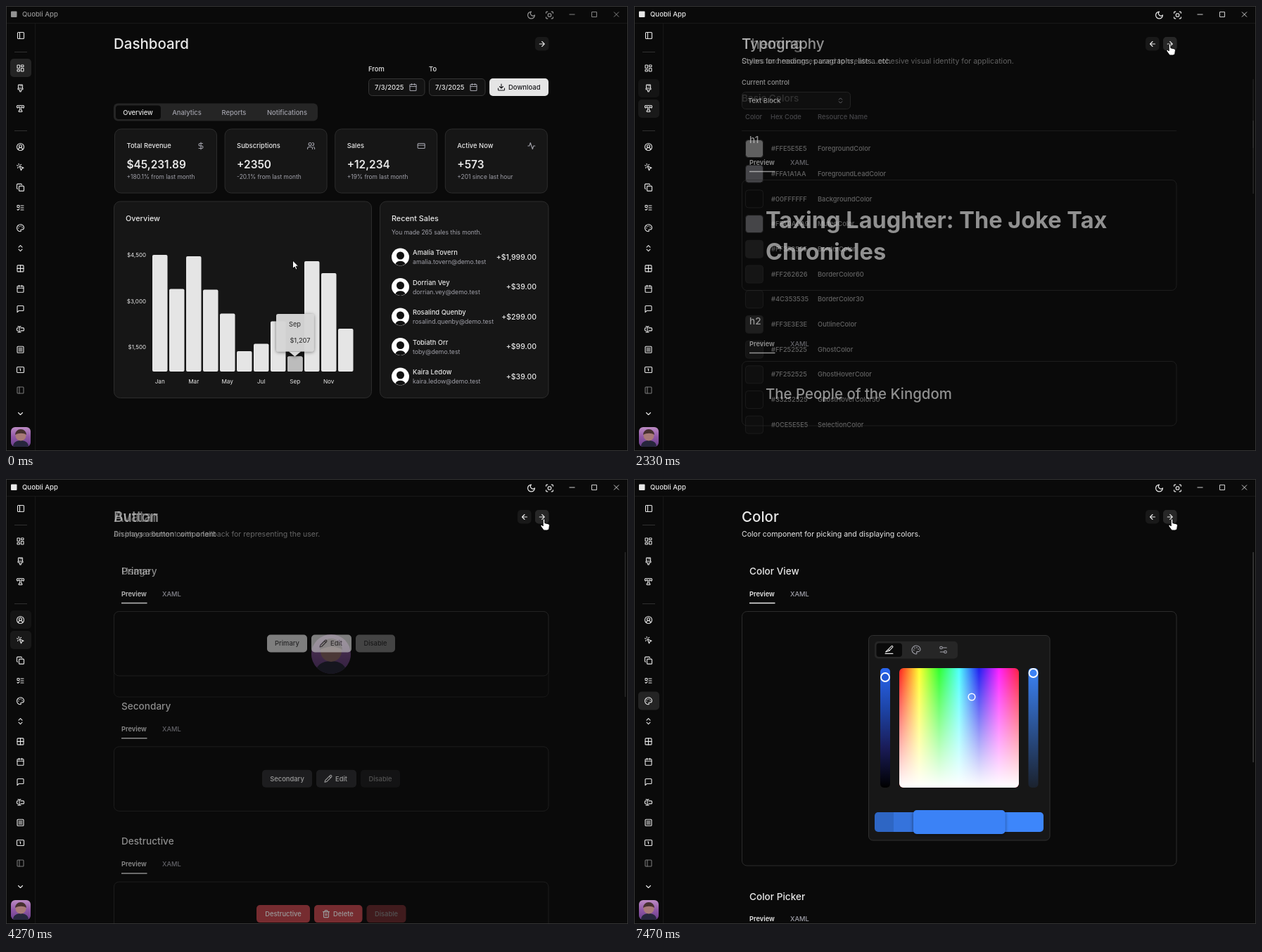
An HTML page that plays this animation: 884 by 633 pixels, repeating every 8 s.

```html
<!DOCTYPE html>
<html lang="en">
<head>
<meta charset="utf-8">
<title>Component gallery</title>
<style>
html, body { margin: 0; width: 100%; height: 100%; overflow: hidden; background: #0a0a0a; }
svg { display: block; width: 884px; height: 633px; }
text { font-family: Inter, sans-serif; white-space: pre; }
.icon { fill: none; stroke-linecap: round; stroke-linejoin: round; }
</style>
</head>
<body>
<svg id="stage" viewBox="0 0 884 633"></svg>
<script>
const FG = '#e8e8e8', MUTED = '#a1a1aa', DARK = '#18181b', LINE = '#2c2c2c', CARD = '#161616';

// Drawing helpers
const text = (x, y, s, size = 9.4, fill = FG, anchor = 'start', weight = 500) =>
  `<text x="${x}" y="${y}" font-size="${size}" font-weight="${weight}" fill="${fill}" text-anchor="${anchor}">${s}</text>`;
const mid = (x, y, s, fill = FG, size = 9.4) => text(x, y, s, size, fill, 'middle');
const rect = (x, y, w, h, r = 0, fill = 'none', stroke = 'none', more = '') =>
  `<rect x="${x}" y="${y}" width="${w}" height="${h}" rx="${r}" fill="${fill}" stroke="${stroke}" ${more}/>`;
const circle = (x, y, r, fill = 'none', stroke = 'none', width = 1) =>
  `<circle cx="${x}" cy="${y}" r="${r}" fill="${fill}" stroke="${stroke}" stroke-width="${width}"/>`;
const path = (d, stroke = LINE, fill = 'none', width = 1) =>
  `<path d="${d}" stroke="${stroke}" fill="${fill}" stroke-width="${width}"/>`;
const group = (s, opacity = 1, id = '') => `<g id="${id}" opacity="${opacity}">${s}</g>`;
const each = (list, f) => list.map(f).join('');

// Icons on a 24-unit grid
const p = d => `<path d="${d}"/>`;
const box = (x, y, w, h, r = 2) => `<rect x="${x}" y="${y}" width="${w}" height="${h}" rx="${r}"/>`;
const dot = (x, y, r) => `<circle cx="${x}" cy="${y}" r="${r}"/>`;
const ICONS = {
  panel: box(3, 3, 18, 18) + p('M9 3v18'),
  dash: box(3, 3, 7, 9, 1) + box(14, 3, 7, 5, 1) + box(14, 12, 7, 9, 1) + box(3, 16, 7, 5, 1),
  brush: p('M10 2v2M14 2v4M6 12V3a1 1 0 0 1 1-1h10a1 1 0 0 1 1 1v9zM6 12a1 1 0 0 0-1 1v1a2 2 0 0 0 2 2h2a1 1 0 0 1 1 1v3a2 2 0 1 0 4 0v-3a1 1 0 0 1 1-1h2a2 2 0 0 0 2-2v-1a1 1 0 0 0-1-1'),
  type: p('M14 17h1a2 2 0 0 1 0 4H9a2 2 0 0 1 0-4h1V7H6v1a2 2 0 0 1-4 0V5a2 2 0 0 1 2-2h16a2 2 0 0 1 2 2v3a2 2 0 0 1-4 0V7h-4z'),
  user: p('M18 20a6 6 0 0 0-12 0') + dot(12, 10, 4) + dot(12, 12, 10),
  click: p('M14 4l-2 2M5 8l-3-1M6 12l-2 2M7 2l1 3M9 9l12 5-5 2-2 5z'),
  copy: box(8, 8, 14, 14) + p('M4 16a2 2 0 0 1-2-2V4a2 2 0 0 1 2-2h10a2 2 0 0 1 2 2'),
  todo: box(3, 5, 6, 6, 1) + p('M3 17l2 2 4-4M13 6h8M13 12h8M13 18h8'),
  palette: dot(13.5, 6.5, .5) + dot(17.5, 10.5, .5) + dot(8.5, 7.5, .5) + dot(6.5, 12.5, .5) +
    p('M12 2a10 10 0 0 0 0 20c1.6 0 2.1-1.6 1.2-2.8-1-1.4 0-2.8 1.2-2.8h2c3 0 5.6-2.5 5.6-5.6C22 6 17.5 2 12 2z'),
  updown: p('M7 15l5 5 5-5M7 9l5-5 5 5'),
  grid: box(3, 3, 18, 18) + p('M12 3v18M3 12h18'),
  calendar: box(3, 4, 18, 18) + p('M8 2v4M16 2v4M3 10h18'),
  chat: p('M21 15a2 2 0 0 1-2 2H7l-4 4V5a2 2 0 0 1 2-2h14a2 2 0 0 1 2 2z'),
  input: p('M5 4h1a3 3 0 0 1 3 3 3 3 0 0 1 3-3h1M13 20h-1a3 3 0 0 1-3-3 3 3 0 0 1-3 3H5M5 16H4a2 2 0 0 1-2-2v-4a2 2 0 0 1 2-2h1M13 8h7a2 2 0 0 1 2 2v4a2 2 0 0 1-2 2h-7M9 7v10'),
  list: box(3, 3, 18, 18) + p('M7 8h10M7 12h10M7 16h10'),
  number: box(2, 4, 20, 16) + p('M10 9h2v6'),
  down: p('M6 9l6 6 6-6'),
  moon: p('M12 3a6 6 0 0 0 9 9 9 9 0 1 1-9-9z'),
  full: p('M3 7V5a2 2 0 0 1 2-2h2M17 3h2a2 2 0 0 1 2 2v2M21 17v2a2 2 0 0 1-2 2h-2M7 21H5a2 2 0 0 1-2-2v-2') + box(8, 8, 8, 8),
  right: p('M5 12h14M12 5l7 7-7 7'),
  left: p('M19 12H5M12 5l-7 7 7 7'),
  save: p('M21 15v4a2 2 0 0 1-2 2H5a2 2 0 0 1-2-2v-4M7 10l5 5 5-5M12 15V3'),
  dollar: p('M12 2v20M17 5H9.5a3.5 3.5 0 0 0 0 7h5a3.5 3.5 0 0 1 0 7H6'),
  users: dot(9, 7, 4) + p('M16 21v-2a4 4 0 0 0-4-4H6a4 4 0 0 0-4 4v2M22 21v-2a4 4 0 0 0-3-4M16 3a4 4 0 0 1 0 8'),
  credit: box(2, 5, 20, 14) + p('M2 10h20'),
  pulse: p('M22 12h-4l-3 9L9 3l-3 9H2'),
  pencil: p('M17 3a2.8 2.8 0 0 1 4 4L7.5 20.5 2 22l1.5-5.5zM15 5l4 4'),
  trash: p('M3 6h18M19 6v14a2 2 0 0 1-2 2H7a2 2 0 0 1-2-2V6M8 6V4a2 2 0 0 1 2-2h4a2 2 0 0 1 2 2v2M10 11v6M14 11v6'),
  paint: p('M3 21h18M4 17l9-3 8-9a2 2 0 0 0-3-2l-8 8zM10 11l3 3'),
  sliders: p('M20 7h-9M14 17H5') + dot(17, 17, 3) + dot(7, 7, 3)
};
const icon = (name, x, y, color = FG, k = .5) =>
  `<g class="icon" stroke="${color}" stroke-width="${k > .55 ? 1.8 : 2.2}" transform="translate(${x} ${y}) scale(${k}) translate(-12 -12)">${ICONS[name]}</g>`;

const person = (x, y, k) => `<g transform="translate(${x} ${y}) scale(${k})">
  <path d="M-11 14C-11 7-5 5 0 5S11 7 11 14z" fill="#26263c"/><circle cy="-2" r="7.5" fill="#a87a78"/>
  <path d="M-8 -3a8 8 0 0 1 16 0c-4-3-11-3-16 0z" fill="#46302f"/></g>`;

// Shared page parts
const header = (title, sub) => text(153, 61.3, title, 20.5) + text(153, 82.3, sub, 10.55, FG, 'start', 400);
const scrollbar = (y, end) => rect(879.5, y, 1.2, end - y, .5, '#484848');
const section = (title, y, h) => text(164, y + 4.8, title, 13.6) +
  text(164, y + 35.7, 'Preview', 9.3, FG, 'start', 600) + text(222, y + 35.7, 'XAML', 9.3, MUTED) +
  path(`M164 ${y + 45.5}h36.5`, FG, 'none', 1.5) + rect(153.5, y + 57.5, 617.5, h, 7, 'none', LINE);
const field = (x, y, w, s, color = FG) => rect(x, y, w, 24, 5, '#141414', '#333') + text(x + 8.5, y + 15.7, s, 9.4, color);
const select = (x, y, w, s) => field(x, y, w, s) + icon('updown', x + w - 14, y + 12, MUTED, .45);
const button = (x, y, w, s, fill, color, glyph) => rect(x, y, w, 25, 5, fill) +
  (glyph ? icon(glyph, x + 17, y + 12.5, color) + text(x + 27, y + 15.8, s, 9.4, color) : mid(x + w / 2, y + 15.8, s, color));

function dashboard() {
  const stats = [
    ['Total Revenue', '$45,231.89', '+180.1% from last month', 'dollar'],
    ['Subscriptions', '+2350', '-20.1% from last month', 'users'],
    ['Sales', '+12,234', '+19% from last month', 'credit'],
    ['Active Now', '+573', '+201 since last hour', 'pulse']
  ];
  const sales = [
    ['Amalia Tovern', 'amalia.tovern', '1,999'],
    ['Dorrian Vey', 'dorrian.vey', '39'],
    ['Rosalind Quenby', 'rosalind.quenby', '299'],
    ['Tobiath Orr', 'toby', '99'],
    ['Kaira Ledow', 'kaira.ledow', '39']
  ];
  const tops = [354, 402.5, 356, 403.5, 437.5, 491, 480.5, 448.5, 498.5, 363, 380, 459];
  const date = x => rect(x, 103.5, 79.5, 24, 5, '#131313', '#353535') + text(x + 8.5, 119, '7/3/2025') +
    icon('calendar', x + 63, 115.5, MUTED);
  const tip = rect(400, 498.5, 21.5, 21.5, 2, '#bcbcbc') + '<g filter="url(#shadow)">' +
    rect(384, 438, 53.5, 53.5, 3, '#d8d8d8', 'none', 'opacity=".95"') + path('M402 491.5h17l-8.5 7z', 'none', '#d8d8d8') + '</g>' +
    mid(410.5, 456, 'Sep', '#3c3c3c', 9.2) + mid(418, 478.7, '$1,207', '#3c3c3c', 9.2);
  return text(153, 61.3, 'Dashboard', 20.5) +
    text(515, 92.8, 'From') + text(601, 92.8, 'To') + date(515.5) + date(601.5) +
    rect(687, 103, 84, 25, 5, '#e5e5e5') + icon('save', 704, 115.5, DARK) + text(714, 118.9, 'Download', 9.5, DARK) +
    rect(153, 138.5, 290, 25, 6, '#252525') + rect(156, 141.5, 64, 19.5, 4, '#0a0a0a') +
    mid(187.5, 154.7, 'Overview') + mid(257, 154.7, 'Analytics', MUTED) + mid(324, 154.7, 'Reports', MUTED) + mid(399.5, 154.7, 'Notifications', MUTED) +
    each(stats, ([name, value, note, glyph], i) => {
      const x = 154.5 + i * 156.6;
      return rect(x, 175, 145, 91, 9, CARD, LINE) + text(x + 17, 202, name) + icon(glyph, x + 122.5, 199, MUTED) +
        text(x + 17, 230.7, value, 15.4, FG, 'start', 600) + text(x + 17, 246.3, note, 8.4, MUTED, 'start', 400);
    }) +
    rect(153.5, 278, 366, 279.5, 9, CARD, LINE) + text(170, 306, 'Overview', 10.8) +
    each(['$4,500', '$3,000', '$1,500'], (s, i) => text(199, 357 + i * 65.6, s, 8, FG, 'end', 400)) +
    each(tops, (y, i) => rect(208 + i * 24, y, 21.5, 520 - y, 2, '#e5e5e5')) +
    each(['Jan', 'Mar', 'May', 'Jul', 'Sep', 'Nov'], (s, i) => text(218.7 + i * 48, 536.5, s, 8.2, FG, 'middle', 400)) +
    group(tip, 1, 'tip') +
    rect(531.5, 278, 239.5, 279.5, 9, CARD, LINE) + text(548, 306, 'Recent Sales', 10.8) +
    text(548, 324.7, 'You made 265 sales this month.', 8.5, MUTED, 'start', 400) +
    each(sales, ([name, mail, sum], i) => {
      const y = 357 + i * 42.5;
      return circle(560.5, y, 12.5, '#fff') + circle(560.5, y - 2, 5.5, '#111') +
        `<path transform="translate(560.5 ${y})" d="M-7 10a7.5 6.5 0 0 1 14 0a12.2 12.2 0 0 1-14 0z" fill="#111"/>` +
        text(578, y - 2.7, name) + text(578, y + 10.3, mail + '@demo.test', 8.7, MUTED, 'start', 400) +
        text(754, y + 3.8, `+$${sum}.00`, 10.5, FG, 'end');
    });
}

function theming() {
  const colors = ['FFE5E5E5 Foreground', 'FFA1A1AA ForegroundLead', '00FFFFFF Background', 'FFA0A0A9 Muted', 'FF353535 Border',
    'FF262626 Border 60', '4C353535 Border 30', 'FF3E3E3E Outline', 'FF252525 Ghost', '7F252525 GhostHover', '33252525 GhostHover 50', '0CE5E5E5 Selection'];
  return header('Theming', 'Colors and resources used to create a cohesive visual identity for application.') +
    text(153, 135.8, 'Basic Colors', 13.6) + text(158, 161.3, 'Color', 9.4, MUTED) + text(194, 161.3, 'Hex Code', 9.4, MUTED) +
    text(261, 161.3, 'Resource Name', 9.4, MUTED) + path('M153 177.5h618', '#333') + scrollbar(104, 202) +
    each(colors, (c, i) => {
      const [hex, name, tail = ''] = c.split(' '), y = 202.5 + i * 35.7;
      return rect(158.5, y - 12, 25, 25, 4, '#' + hex.slice(2) + hex.slice(0, 2), '#353535') +
        text(195, y + 3.6, '#' + hex, 9.3) + text(261, y + 3.6, name + 'Color' + tail, 9.3);
    });
}

const typography = () => header('Typography', 'Styles for headings, paragraphs, lists...etc.') +
  text(153, 112, 'Current control') + select(153.5, 122.5, 154, 'Text Block') + scrollbar(163, 267) +
  section('h1', 190, 157) + text(187, 315.7, 'Taxing Laughter: The Joke Tax', 32.5, FG, 'start', 700) +
  text(187, 361, 'Chronicles', 32.5, FG, 'start', 700) +
  section('h2', 448, 91.5) + text(187, 558.7, 'The People of the Kingdom', 20.4, FG, 'start', 500);

const avatar = () => header('Avatar', 'An image element with a fallback for representing the user.') + section('Usage', 131, 121.5) +
  circle(462, 249, 28, 'url(#pink)') + `<g clip-path="url(#round)">${person(462, 249, 2)}</g>`;

function buttons() {
  const kinds = [
    ['Primary', 371, 57, 'Edit', 57, '#d0d0d0', '#3a3a3c', 'pencil'],
    ['Secondary', 364, 71, 'Edit', 57, '#2c2c2f', '#fff', 'pencil'],
    ['Destructive', 356, 76, 'Delete', 68.5, '#c2444c', '#fff', 'trash']
  ];
  return header('Button', 'Displays a button component') + scrollbar(104, 310) +
    each(kinds, ([name, x, w, verb, w2, fill, color, glyph], i) => {
      const y = 131 + i * 192.3;
      return section(name, y, 91.5) + button(x, y + 90.5, w, name, fill, color) +
        button(x + w + 6, y + 90.5, w2, verb, fill, color, glyph) +
        group(button(x + w + w2 + 12, y + 90.5, 56, 'Disable', fill, color), .5);
    });
}

const card = () => header('Card', 'Displays a card with header, content, and footer.') + section('Usage', 131, 312) +
  rect(342.5, 227.5, 239.5, 231.5, 8, CARD, LINE) + text(359, 256, 'Create project', 10.8) +
  text(359, 269.3, 'Deploy your new project in one-click.', 8.4, MUTED, 'start', 400) +
  text(359, 298.5, 'Name') + field(359.5, 306.5, 205, 'Name of your project', '#8b8b92') +
  text(359, 352.3, 'Framework') + select(359.5, 362.5, 205, 'Vorn.js') +
  rect(359.5, 417.5, 53.5, 24, 5, CARD, '#353535') + mid(386, 433, 'Cancel') + button(511.5, 417, 53.5, 'Deploy', '#e5e5e5', DARK);

const checkbox = () => header('CheckBox', 'A control that allows the user to toggle between checked and not checked.') + scrollbar(104, 424) +
  each(['Default', 'Disabled', 'Indeterminate'], (name, i) => {
    const y = 131 + i * 181.3, on = i == 2;
    return section(name, y, 80) + group(
      rect(388.5, y + 91.5, 12, 12, 2.5, on ? '#b4b4b4' : '#1a1a1a', on ? '#b4b4b4' : '#3e3e3e') +
      (on ? path(`M391 ${y + 97.5}h7`, DARK, 'none', 1.2) : '') + text(407, y + 101.2, 'Accept terms and conditions'), i == 1 ? .5 : 1);
  });

const color = () => header('Color', 'Color component for picking and displaying colors.') + scrollbar(104, 403) +
  section('Color View', 131, 361.5) + section('Color Picker', 593.7, 80) +
  rect(333.5, 222.5, 257.5, 291.5, 6, '#171717', '#303030') + rect(342, 231, 118, 24.5, 5, '#262626') + rect(344.5, 233.5, 36.5, 19.5, 4, '#0a0a0a') +
  icon('paint', 362.5, 243, FG, .6) + icon('palette', 401, 243, MUTED, .6) + icon('sliders', 439.5, 243, MUTED, .6) +
  rect(350, 269, 14, 170, 5, 'url(#value)') + circle(357, 282, 6, '#2258d6', '#fff', 1.8) +
  rect(377, 269, 170, 170, 6, 'url(#hue)') + rect(377, 269, 170, 170, 6, 'url(#white)') + circle(480, 310, 4.8, 'none', '#fff', 1.5) +
  rect(560.5, 269, 14, 170, 5, 'url(#alpha)') + circle(567.5, 276, 6, '#3b82f6', '#fff', 1.8) +
  rect(342, 474, 60, 28, 5, '#2e66c4') + rect(369, 474, 40, 28, 0, '#3573dc') + rect(510, 474, 72, 28, 5, '#3d86fb') +
  `<g filter="url(#shadow)">${rect(397, 471, 130.5, 34, 5, '#3b82f6')}</g>`;

const gradient = (id, stops, down = 1) => `<linearGradient id="${id}" x2="${1 - down}" y2="${down}">` +
  each(stops, (c, i) => `<stop offset="${i / (stops.length - 1)}" stop-color="${c}"/>`) + '</linearGradient>';
const defs = '<defs>' + gradient('value', ['#2a66f0', '#1d45a8', '#1a1c58', '#000']) + gradient('white', ['#fff0', '#fff']) +
  gradient('alpha', ['#3b82f6', '#3b82f61a']) + gradient('pink', ['#bd8cc4', '#8f56a6', '#6a3f8c']) +
  gradient('hue', ['#ff2020', '#ffff30', '#30ff30', '#50ffff', '#2020f0', '#ff20ff', '#ff2040'], 0) +
  `<filter id="shadow" x="-30%" y="-30%" width="160%" height="160%"><feDropShadow dx="0" dy="1" stdDeviation="2.5" flood-opacity=".5"/></filter>
  <clipPath id="round">${circle(462, 249, 28)}</clipPath><clipPath id="tile">${rect(7, 599, 28, 28, 6)}</clipPath></defs>`;

const pages = [dashboard, theming, typography, avatar, buttons, card, checkbox, color];
const menuY = [88, 117, 146, 200, 229, 258, 286.5, 315.5];
const lower = ['user', 'click', 'copy', 'todo', 'palette', 'updown', 'grid', 'calendar', 'chat', 'input', 'list', 'number'];

const titlebar = rect(7, 7.5, 8.5, 8.5, 1, FG) + text(23, 15.3, 'Quobli App', 9.6) + icon('moon', 746.5, 13, FG, .55) +
  icon('full', 772.5, 13, FG, .55) + path('M800.5 12h8M832.5 8.5h7v7h-7zM864 8.5l7 7m0-7l-7 7', '#cfcfcf');
const sidebar = each(menuY, (y, i) => group(rect(6, y - 13, 30, 26, 5, '#242424'), 0, 'menu' + i)) +
  icon('panel', 21, 42) + path('M12 65.5h18M12 177.5h18', '#303030') +
  icon('dash', 20.5, 88.5) + icon('brush', 20.5, 117) + icon('type', 20.5, 146) +
  each(lower, (name, i) => icon(name, 20.5, 200.5 + i * 28.82)) + icon('panel', 20.5, 546.5, '#777') + icon('down', 20.5, 580) +
  `<g clip-path="url(#tile)">${rect(7, 599, 28, 28, 0, 'url(#pink)')}${person(21, 613, 1)}</g>`;
const arrows = group(rect(727, 44, 19.5, 19.5, 5, '#191919') + icon('left', 737, 54), 0, 'back') +
  rect(752, 44, 19.5, 19.5, 5, '#191919') + group(rect(752, 44, 19.5, 19.5, 5, '#272727'), 0, 'hover') + icon('right', 761.7, 54);
const cursor = '<g id="cursor" stroke="#000" fill="#fff" stroke-width=".9" stroke-linejoin="round">' +
  '<path id="arrow" d="M0 0v11.5l2.7-2.5 1.8 4 1.9-.8-1.8-4h3.6z"/>' +
  '<path id="hand" d="M-1.3 1.2a1.3 1.3 0 0 1 2.6 0v4.5l5 1.2a2 2 0 0 1 1.6 2.2l-.6 4.3a3 3 0 0 1-3 2.6H1.2a3 3 0 0 1-2.4-1.2l-3-4.4a1.2 1.2 0 0 1 1.8-1.6l1.1 1.2z"/></g>';

const $ = id => document.getElementById(id);
$('stage').innerHTML = defs + rect(0, 0, 884, 633, 0, '#0a0a0a') + path('M0 24.5h884M41.5 25v608', '#181818') +
  group(titlebar, 1, 'bar') + sidebar + each(pages, (page, i) => group(page(), 0, 'page' + i)) + arrows +
  rect(.5, .5, 883, 632, 0, 'none', '#353535') + cursor;

const ramp = (t, start, length) => Math.min(1, Math.max(0, (t - start) / length));
const smooth = k => k * k * (3 - 2 * k);
const fade = (id, value) => $(id).setAttribute('opacity', value);

// Page changes: start, length, opacity at the start (slow pages begin part-way)
const changes = [[1460, 70, .5], [2130, 330, 0], [3340, 300, 0], [4265, 250, .58], [4930, 250, 0], [6000, 330, 0], [7270, 200, 0]];

function draw(now) {
  const t = now % 8000;
  const shown = [1, ...changes.map(([start, length, from]) => t < start ? 0 : from + (1 - from) * ramp(t, start, length)), 0];
  pages.forEach((_, i) => {
    const k = shown[i] * (1 - shown[i + 1]);
    fade('page' + i, k);
    fade('menu' + i, k);
    $('page' + i).style.display = k ? '' : 'none';
  });
  fade('back', shown[1]);
  fade('bar', .62 + .38 * ramp(t, 930, 130));
  fade('tip', 1 - ramp(t, 200, 120));
  fade('hover', ramp(t, 930, 150));

  const go = smooth(ramp(t, 40, 830)), rise = ramp(t, 870, 70), nudge = t < 2730 ? 0 : 3;
  const x = 407.5 + 354 * go + nudge, y = 362 - 293 * go - 15 * rise + nudge;
  $('cursor').setAttribute('transform', `translate(${x} ${y})`);
  $('arrow').style.display = t < 930 ? '' : 'none';
  $('hand').style.display = t < 930 ? 'none' : '';
  requestAnimationFrame(draw);
}
requestAnimationFrame(draw);
</script>
</body>
</html>
```
